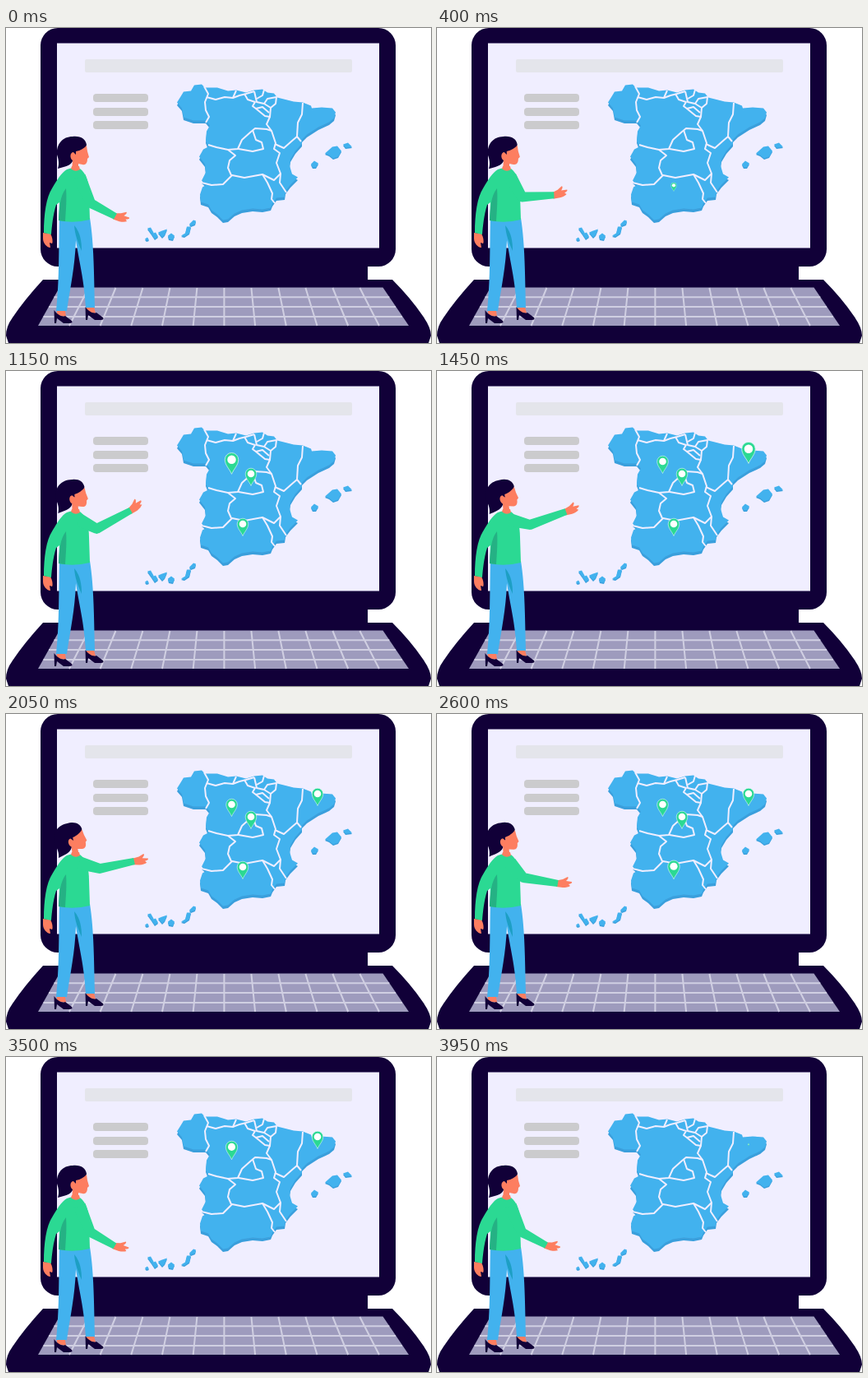
These frames come from a looping animation (517x383 px, 4000 ms). An HTML page:

```html
<!DOCTYPE html>
<html lang="en">
<head>
<meta charset="utf-8">
<title>Map on a laptop</title>
<style>
html, body { margin: 0; width: 100%; height: 100%; overflow: hidden; background: #fff; }
svg { display: block; width: 517px; height: 383px; }
.dark { fill: #110038; }
.skin { fill: #fd7e60; }
.green { fill: #2bd993; }
.blue { fill: #42b2ee; }
.shade { fill: #3a9fdc; }
.line { fill: none; stroke: #f0eeff; stroke-width: 2; stroke-linejoin: round; }
</style>
</head>
<body>
<svg viewBox="0 0 517 383">
  <defs>
    <path id="land" d="M208 91L213 83 216 78 225 77 229 70 238 69 242 73 257 73 270 77 280 76 292 79 302 76 312 75 318 79 326 80 330 85 338 87 350 90 361 91 371 95 372 98 384 97 397 98 401 103 399 110 393 115 380 121 366 130 360 136 360 141 352 150 346 160 345 168 348 178 355 182 346 191 340 199 339 206 329 207 324 214 322 219 312 221 300 220 287 222 278 226 270 233 264 234 257 227 250 222 246 215 237 212 236 203 239 194 244 191 238 186 243 176 242 166 235 157 240 148 246 145 243 137 244 126 248 119 243 113 228 113 216 109 214 98Z"/>
    <g id="isles">
      <path d="M388 153L397 145 403 144 408 150 404 157 398 159 393 155Z"/>
      <path d="M410 142L416 140 421 145 413 146Z"/>
      <path d="M371 166L375 162 380 165 377 170 373 170Z"/>
      <path d="M169 257L172 255 174 258 171 259Z"/>
      <path d="M172 244L176 243 180 250 177 251Z"/>
      <path d="M177 251L182 249 185 254 181 257Z"/>
      <path d="M185 249L190 247 196 245 193 252 190 255Z"/>
      <path d="M197 253L201 250 205 253 203 258 198 257Z"/>
      <path d="M213 253L218 250 220 242 225 242 223 250 217 254Z"/>
      <path d="M223 239L228 234 231 235 230 239 225 241Z"/>
    </g>
  </defs>

  <!-- laptop -->
  <g class="dark">
    <rect x="42" width="432" height="290" rx="21"/>
    <path d="M76 280H440V308H76Z"/>
    <path d="M45 306H470Q492 328 507 350Q517 364 517 374L514 383H3L0 374Q0 363 8 352Q22 331 45 306Z"/>
  </g>
  <path fill="#f0eeff" d="M62 18.500H454V267.500H62Z"/>
  <path fill="#9e9bbd" d="M65 315.500H458.500L490 362H39Z"/>
  <path id="keys" fill="none" stroke="#d0cfe2" stroke-width="2"/>
  <rect x="96" y="38" width="325" height="16" rx="2" fill="#e4e5eb"/>
  <g fill="#cbcbcd">
    <rect x="106" y="80" width="67" height="10" rx="4"/>
    <rect x="106" y="97" width="67" height="10" rx="4"/>
    <rect x="106" y="113" width="67" height="10" rx="4"/>
  </g>

  <!-- map -->
  <g class="shade"><use href="#land" y="3"/><use href="#isles" y="1"/></g>
  <g class="blue"><use href="#land" y="-.5"/><use href="#isles" y="-.5"/></g>
  <g class="line">
    <path d="M241 71L246 80 242 90 243 100 247 108 243 115"/>
    <path d="M244 84L255 87 266 84 276 85 284 82 292 80 302 77"/>
    <path d="M276 85L280 76"/>
    <path d="M290 80L294 87 303 90 300 95 304 98 312 96 320 103"/>
    <path d="M302 77L305 90 314 92 322 97 321 108 315 107 304 98"/>
    <path d="M305 86L312 82 314 75"/>
    <path d="M314 92L318 86 329 84 328 92 322 97"/>
    <path d="M321 108L317 117 323 125 328 140 326 147 333 152 329 164 334 177 333 188 341 200"/>
    <path d="M361 91L360 105 355 115 354 132 359 138"/>
    <path d="M327 141L338 146 347 138 354 132"/>
    <path d="M246 142L256 145 270 148 282 147 287 136 297 127 303 122 317 123 323 125"/>
    <path d="M300 124L304 136 311 139 313 147 300 150 283 147"/>
    <path d="M270 148L279 155 272 161 270 170 274 179"/>
    <path d="M238 188L250 191 264 190 275 179 290 182 312 178 318 188 324 201 323 208 327 213"/>
    <path d="M312 178L326 185 334 177"/>
  </g>
  <g id="pins"></g>

  <!-- woman -->
  <g id="head">
    <path class="dark" d="M63 171C65 165 64 160 62 154C61 141 69 132 81 132C91 131 97 135 98 142L96 149L86 152L81 162C78 168 70 169 63 171Z"/>
    <path class="skin" d="M85 150C91 149 95 146 98 143L99 150L101 157L99 159C99 164 97 167 93 166L88 165L88 173H80L81 161C77 158 78 151 82 151L85 154Z"/>
  </g>
  <path class="skin" d="M45 249L54 250C57 255 57 261 56 262L53 261L54 267C50 267 45 262 45 256Z"/>
  <g class="skin">
    <path d="M62 338H71L73 351L62 349Z"/>
    <path d="M98 335H106L109 347L98 345Z"/>
  </g>
  <path class="blue" d="M65 231H102C107 262 107 300 108 340H97C95 305 89 285 85 258C84 290 78 316 74 344H61C65 305 64 270 65 231Z"/>
  <path fill="#1d9fc4" d="M83 240C84 252 87 260 92 271C92 258 90 248 83 240Z"/>
  <g class="dark">
    <path id="shoe" d="M58.500 343C62 348 68 352 72 350L80 356Q82 359 77 359H70L62 353L61 359H59Z"/>
    <use href="#shoe" x="38" y="-4"/>
  </g>
  <path class="green" d="M74 172Q80 169 90 171C98 177 101 188 101 202L102 233Q82 238 64 234L65 212L61 215C57 228 56 240 55 251L46 249C46 226 49 206 56 195C62 185 67 176 74 172Z"/>
  <path fill="#25b184" d="M73 195C65 205 65 220 64 234L72 235C73 220 74 208 73 195Z"/>
  <path class="skin" d="M80 168H89L90 172Q84 176 79 171Z"/>
  <path class="skin" id="hand" d="M-2 -3.500L6 -5L12 -8Q14 -7 10 -3L17 -2Q18 0 13 1L15 3Q12 5 6 5L-2 4Z"/>
  <path class="green" id="sleeve"/>
</svg>

<script>
const $ = id => document.getElementById(id);
const LOOP = 4000, STEP = 50;

// keyboard grid: columns fan out from the upright middle one
let grid = "";
for (let i = -5; i < 6; i++) grid += `M${265.4 + i * 33} 316L${265.4 + i * 37.7} 362`;
for (let i = 1; i < 4; i++) grid += `M${65 - i * 6.5} ${315.5 + i * 11.8}H${458.5 + i * 7.8}`;
$("keys").setAttribute("d", grid);

// tip x, tip y, time in, time out
const pins = [
  [288, 200.5, 360, 2930],
  [298, 139.5, 670, 3220],
  [274.5, 124.5, 970, 3600],
  [379, 111.5, 1290, 3960]
];
$("pins").innerHTML = pins.map(() => `<g>
  <path class="green" stroke="#d9f6f3" stroke-width=".6" d="M0 0C-2 -5 -6.800 -9 -6.800 -14.500A6.800 6.800 0 0 1 6.800 -14.500C6.800 -9 2 -5 0 0Z"/>
  <circle cy="-14.500" r="4.300" fill="#fff"/></g>`).join("");

// time, elbow x y, wrist x y, hand angle, head angle
const poses = [
  [0, 103, 213, 133, 229, 12, 0],
  [550, 104, 202, 146, 191, -30, -1],
  [850, 107, 198, 146, 172, -52, -2],
  [1450, 113, 187, 157, 171, -20, -9],
  [2050, 114, 188, 156, 179, -5, -12],
  [2600, 105, 199, 147, 206, 0, -7],
  [3100, 103, 211, 134, 227, 10, -1],
  [4000, 103, 213, 133, 229, 12, 0]
];

// smooth curve through the poses, at rest at both ends
function poseAt(t) {
  const last = poses.length - 1;
  let i = 0;
  while (i < last - 1 && t >= poses[i + 1][0]) i++;
  const a = poses[i], b = poses[i + 1], span = b[0] - a[0], u = (t - a[0]) / span;
  const slope = (k, j) => k === 0 || k === last ? 0 :
    (poses[k + 1][j] - poses[k - 1][j]) / (poses[k + 1][0] - poses[k - 1][0]) * span;
  return a.map((v, j) => {
    const d = b[j] - v, m = slope(i, j), n = slope(i + 1, j);
    return v + u * (m + u * (3 * d - 2 * m - n + u * (m + n - 2 * d)));
  });
}

// grow past full size, then settle
function pop(t) {
  if (t <= 0) return 0;
  if (t < 150) return 1.22 * Math.sin(t / 150 * Math.PI / 2);
  const u = Math.min((t - 150) / 290, 1);
  return 1 + 0.11 * (1 + Math.cos(u * Math.PI));
}

function limb(x1, y1, r1, x2, y2, r2) {
  const len = Math.hypot(x2 - x1, y2 - y1);
  const nx = (y1 - y2) / len, ny = (x2 - x1) / len;
  return `M${x1 + nx * r1} ${y1 + ny * r1}L${x1 - nx * r1} ${y1 - ny * r1}` +
    `L${x2 - nx * r2} ${y2 - ny * r2}L${x2 + nx * r2} ${y2 + ny * r2}Z`;
}

const disc = (x, y, r) => `M${x - r} ${y}a${r} ${r} 0 0 1 ${2 * r} 0a${r} ${r} 0 0 1 ${-2 * r} 0Z`;

function draw(now) {
  const t = Math.floor(now % LOOP / STEP) * STEP;
  const [, ex, ey, wx, wy, hand, head] = poseAt(t);
  $("sleeve").setAttribute("d",
    limb(89, 181, 8, ex, ey, 6) + disc(ex, ey, 6) + limb(ex, ey, 6, wx, wy, 4));
  $("hand").setAttribute("transform", `translate(${wx} ${wy}) rotate(${hand})`);
  $("head").setAttribute("transform", `rotate(${head} 83 168)`);
  pins.forEach(([x, y, start, end], i) => {
    const s = pop(t - start) * pop(end - t);
    $("pins").children[i].setAttribute("transform",
      `translate(${x} ${y - 4}) scale(${s}) translate(0 4)`);
  });
}

const start = performance.now();
function tick() {
  draw(performance.now() - start);
  requestAnimationFrame(tick);
}
tick();
</script>
</body>
</html>
```
